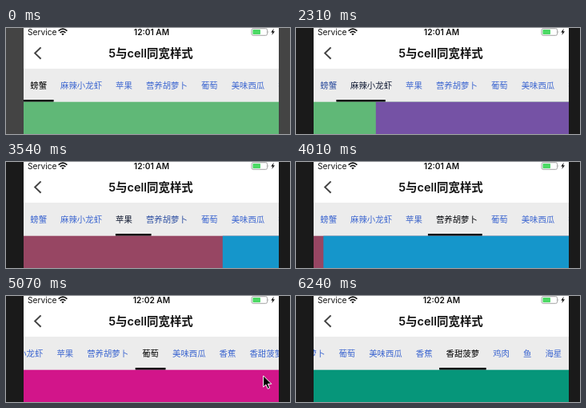
These frames come from a looping animation (355x133 px, 6590 ms). An HTML page:

```html
<!DOCTYPE html>
<html lang="zh">
<head>
<meta charset="utf-8">
<title>Tab bar</title>
<style>
  html, body { margin: 0; width: 100%; height: 100%; overflow: hidden; background: #1a1a1a; }
  svg { display: block; width: 355px; height: 133px; }
  text { font-family: Inter, "Noto Sans CJK SC", "Noto Sans CJK", sans-serif; }
  .status { font-size: 10.2px; fill: #111; }
  .bold { font-weight: 600; text-anchor: middle; }
  .title { font-size: 14.46px; fill: #111; }
  .tab { font-size: 10.4px; }
  #bezel { fill: #1a1a1a; animation: dim 6590ms step-end infinite; }
  @keyframes dim { 0% { fill: #444; } 22.61% { fill: #1a1a1a; } }
</style>
</head>
<body>
<svg viewBox="0 0 355 133">
  <defs><clipPath id="screen"><rect x="22" width="319" height="133"/></clipPath></defs>
  <rect id="bezel" width="355" height="133"/>
  <g clip-path="url(#screen)">
    <rect x="22" width="319" height="51" fill="#fff"/>
    <text class="status" x="27" y="8.6">Service</text>
    <g fill="none" stroke="#111" stroke-width="1.7">
      <path d="M65.6 3.7Q71 -1.3 76.4 3.7M67.6 6Q71 2.8 74.4 6"/>
      <path d="M71 9.2L69.3 7.4Q71 6 72.7 7.4Z" fill="#111" stroke="none"/>
    </g>
    <text id="clock" class="status bold" x="182" y="8.6">12:01 AM</text>
    <rect x="307" y="0.7" width="19.6" height="8.6" rx="2" fill="none" stroke="#999" stroke-width=".9"/>
    <rect x="308.4" y="2" width="9.6" height="6" rx=".8" fill="#4cd964"/>
    <path d="M327.7 3.6q1.4 1.4 0 2.8z" fill="#999"/>
    <path d="M334.8 .8L331.2 5.4H333.3L332.3 9L336 4.2H333.9Z" fill="#111"/>
    <path d="M43.6 24.4L36.2 31.6L43.6 38.8" fill="none" stroke="#444" stroke-width="2"/>
    <text class="title bold" x="181" y="37">5与cell同宽样式</text>
    <rect x="22" y="51" width="319" height="42" fill="#ececec"/>
    <g id="tabs"><rect id="bar" y="90" height="2.7" fill="#000"/></g>
    <rect id="left" x="22" y="92.7" width="319" height="41"/>
    <rect id="right" y="92.7" width="319" height="41"/>
  </g>
  <path id="cursor" d="M0 0V14.2L3.3 11.2L5.6 16.4L8 15.3L5.7 10.3H10.2Z" fill="#000" stroke="#fff" stroke-width="1" stroke-linejoin="round"/>
</svg>
<script>
const LOOP = 6590, WIDTH = 319, LEFT = 22, PAD = 17, CHAR = 10.4;
const labels = ['螃蟹', '麻辣小龙虾', '苹果', '营养胡萝卜', '葡萄', '美味西瓜', '香蕉', '香甜菠萝', '鸡肉', '鱼', '海星'];
const colors = ['#60b877', '#7552a5', '#974663', '#1596cb', '#d2158a', '#b58a3c', '#5b7fb0', '#06967a'];
const TAPPED = 7, TAP = 5600;

// [drag start, drag end, release, settled, share dragged]
const swipes = [
  [1790, 1900, 2200, 2490, 0.30],
  [2720, 2840, 3080, 3370, 0.33],
  [3480, 3590, 3830, 4130, 0.33],
  [4190, 4310, 4370, 4670, 0.33]
];

const $ = id => document.getElementById(id);
const mix = (a, b, u) => a + (b - a) * u;
const easeOut = u => 1 - (1 - u) ** 2.6;
const easeInOut = u => u * u * (3 - 2 * u);

function steps(t, start, end, n) {
  const k = Math.floor((t - start) / (end - start) * (n - 1) + 1e-6) + 1;
  return Math.max(0, Math.min(n, k)) / n;
}

let x = 21.8;
const cells = labels.map(label => {
  const text = document.createElementNS('http://www.w3.org/2000/svg', 'text');
  const cell = { x, w: label.length * CHAR + PAD, text };
  text.textContent = label;
  text.setAttribute('class', 'tab');
  text.setAttribute('x', x + PAD / 2);
  text.setAttribute('y', 76);
  $('tabs').append(text);
  x += cell.w;
  return cell;
});

function pageAt(t) {
  if (t >= TAP) return TAPPED;
  return swipes.reduce((sum, [a, b, c, d, share]) =>
    sum + share * steps(t, a, b, 3) + (1 - share) * easeOut(steps(t, c, d, 6)), 0);
}

function cursorAt(t) {
  if (t < 4845 || t >= 6240) return null;
  const enter = steps(t, 4845, 5130, 6), rise = easeOut(steps(t, 5190, 5360, 4));
  const leave = steps(t, 5950, 6240, 6);
  return [
    mix(345, 310, enter) - 7.5 * rise + 8 * leave,
    mix(126, 87, enter) - 21 * rise + 68 * leave ** 2
  ];
}

function render(t) {
  const page = pageAt(t), i = Math.floor(page + 1e-6), u = Math.max(0, page - i);
  const slide = easeInOut(steps(t, 5660, 5950, 6));
  const scroll = 19.7 * easeInOut(steps(t, 4190, 4430, 5))
    + 54 * easeInOut(steps(t, 4730, 5015, 6)) + 116.8 * slide;

  cells.forEach((cell, n) => {
    const lit = Math.max(0, 1 - Math.abs(n - page));
    const rgb = [60, 102, 208].map(c => Math.round(c * (1 - lit)));
    cell.text.setAttribute('fill', `rgb(${rgb})`);
  });
  $('tabs').setAttribute('transform', `translate(${-scroll})`);

  const tapped = t >= TAP;
  const from = cells[tapped ? 4 : i], to = cells[tapped ? TAPPED : i + 1], v = tapped ? slide : u;
  $('bar').setAttribute('x', mix(from.x, to.x, v));
  $('bar').setAttribute('width', mix(from.w, to.w, v));

  $('left').setAttribute('fill', colors[i]);
  $('right').setAttribute('fill', colors[i + 1] || colors[i]);
  $('right').setAttribute('x', LEFT + WIDTH * (1 - u));

  $('clock').textContent = t < 4490 ? '12:01 AM' : '12:02 AM';
  const pos = cursorAt(t);
  $('cursor').setAttribute('visibility', pos ? 'visible' : 'hidden');
  if (pos) $('cursor').setAttribute('transform', `translate(${pos})`);
}

const begin = performance.now();
function tick() {
  render((performance.now() - begin) % LOOP);
  requestAnimationFrame(tick);
}
tick();
</script>
</body>
</html>
```
